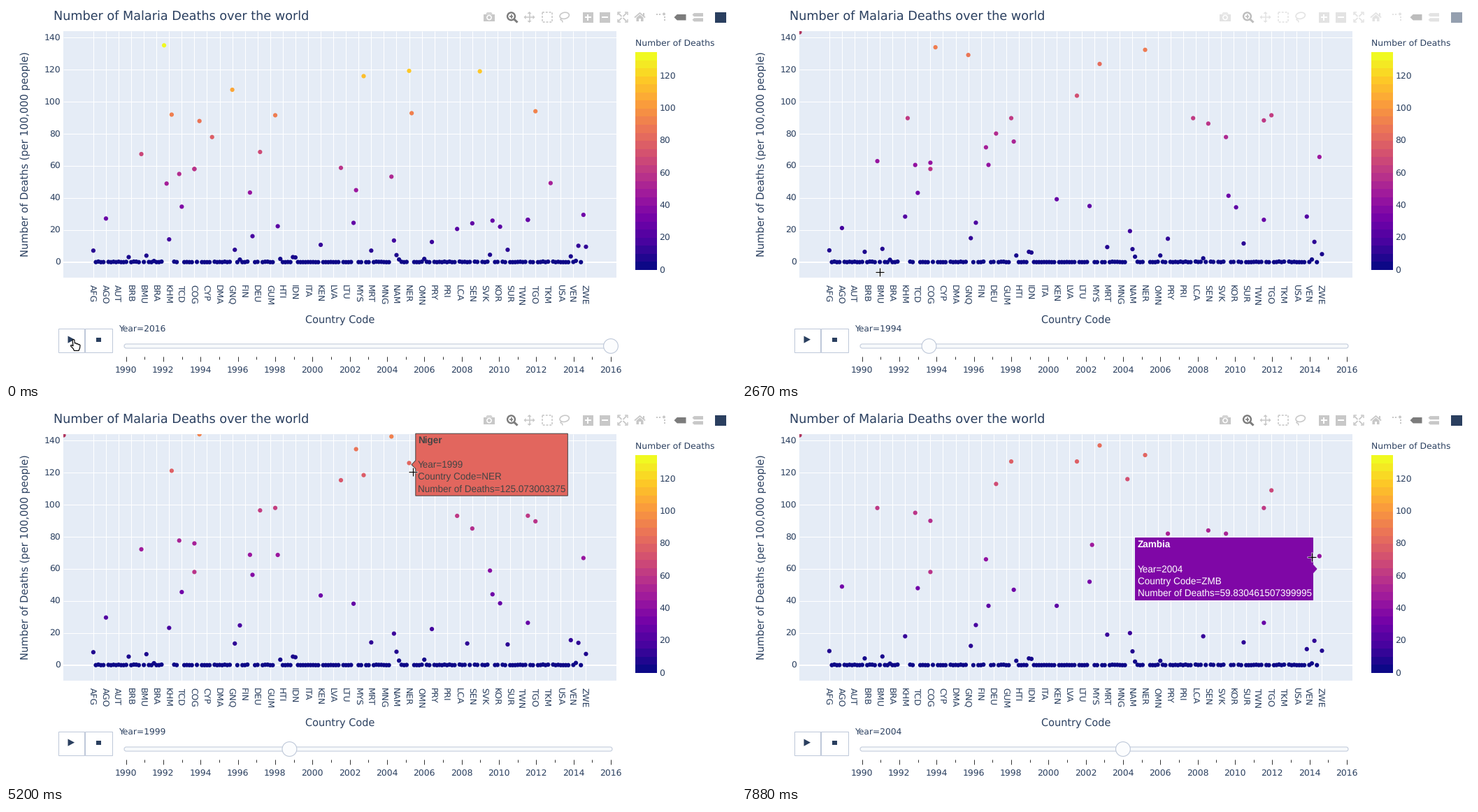
These frames come from a looping animation (1044x537 px, 8000 ms). A matplotlib script:

```python
import matplotlib.pyplot as plt
import numpy as np
from matplotlib.animation import FuncAnimation
from matplotlib.collections import LineCollection
from matplotlib.colors import LinearSegmentedColormap
from matplotlib.patches import Circle, Ellipse, FancyBboxPatch, Polygon, Rectangle

W, H, DPI = 1044, 537, 72          # at 72 dpi one point is one pixel
FRAMES, INTERVAL = 160, 50
STEP = 148.6                       # the picture refreshes this often, in ms
INK, RIM, PAPER = "#2a3f5f", "#bec8d9", "#e5ecf6"
LIGHT, DARK = "#c8c8c8", "#7c7c7c"
PLASMA = LinearSegmentedColormap.from_list("heat", [
    "#0d0887", "#46039f", "#7201a8", "#9c179e", "#bd3786",
    "#d8576b", "#ed7953", "#fb9f3a", "#fdca26", "#f0f921"], N=512)
X0, DX, Y0, DY = 124.9, 3.613, 366.8, 2.2964
SLIDE0, SLIDE_DX = 171.5, 26.673
CODES = ("AFG AGO AUT BRB BMU BRA KHM TCD COG CYP DMA GNQ FIN DEU GUM HTI IDN "
         "ITA KEN LVA LTU MYS MRT MNG NAM NER OMN PRY PRI LCA SEN SVK KOR SUR "
         "TWN TGO TKM USA VEN ZWE").split()

plt.rcParams["font.family"] = "DejaVu Sans"
plt.rcParams["text.hinting"] = "none"
fig = plt.figure(figsize=(W / DPI, H / DPI), dpi=DPI, facecolor="white")
ax = fig.add_axes([0, 0, 1, 1])
ax.set(xlim=(0, W), ylim=(H, 0))
ax.autoscale(False)
ax.axis("off")


# ---- drawing helpers
def text(x, y, s, size=12.4, ha="left", color=INK, **kw):
    return ax.text(x, y, s, fontsize=size, ha=ha, va="baseline", color=color,
                   rotation_mode="anchor", **kw)


def box(x0, y0, x1, y1, fill, edge="none", lw=1, **kw):
    return ax.add_patch(Rectangle((x0, y0), x1 - x0, y1 - y0, fc=fill, ec=edge,
                                  lw=lw, **kw))


def poly(pts, fill, edge="none", lw=1, **kw):
    return ax.add_patch(Polygon(pts, closed=True, fc=fill, ec=edge, lw=lw, **kw))


def disc(x, y, r, fill, edge="none", lw=1, **kw):
    return ax.add_patch(Circle((x, y), r, fc=fill, ec=edge, lw=lw, **kw))


def stroke(xs, ys, color, lw=1.5):
    ax.plot(xs, ys, color=color, lw=lw, solid_capstyle="butt")


def segments(segs, color, lw=1):
    ax.add_collection(LineCollection(segs, colors=color, linewidths=lw, zorder=1.5),
                      autolim=False)


# ---- chart
def draw_chart():
    plot = box(81.5, 36, 873, 389, PAPER)
    ticks = X0 + 5 * DX * np.arange(len(CODES))
    rows = Y0 - DY * np.arange(0, 141, 20)
    segments([[(x, 36), (x, 389)] for x in ticks], "white")
    segments([[(81.5, y), (873, y)] for y in rows], "white")
    segments([[(81.5, Y0), (873, Y0)]], "white", 2)
    for k, y in enumerate(rows):
        text(78, y + 4.3, str(20 * k), ha="right")
    for x, code in zip(ticks, CODES):
        text(x - 5.7, 399, code, rotation=270)
    text(68, 19.3, "Number of Malaria Deaths over the world", 17.6)
    text(477.5, 453.8, "Country Code", 14.5, "center")
    text(31.5, 212, "Number of Deaths (per 100,000 people)", 14.6, "center", rotation=90)
    return plot


def draw_colorbar():
    ax.pcolormesh([900, 931], np.linspace(378, 66, 28), np.arange(27)[:, None],
                  cmap=PLASMA, vmin=0, vmax=26)
    text(900.5, 57, "Number of Deaths")
    for v in range(0, 121, 20):
        text(934.5, 382.5 - 2.315 * v, str(v))


def draw_controls():
    box(75, 462.3, 111.5, 496, "white", RIM)
    stop = box(113.3, 462.3, 151.8, 496, "white", RIM)
    poly([(88.5, 472.5), (98, 477.6), (88.5, 482.8)], INK)
    box(129, 474.7, 135.5, 481.2, INK)
    ax.add_patch(FancyBboxPatch((172, 487), 692, 0.01, fc="#f8fafc", ec=RIM, lw=1,
                                boxstyle="round,pad=3,rounding_size=3"))
    for k in range(27):
        x = SLIDE0 + SLIDE_DX * k
        stroke([x, x], [502, 505.5 if k % 2 else 509], "#333333", 1)
        if k % 2 == 0:
            text(x, 526.3, str(1990 + k), ha="center")
    return stop


def tag(x, y, w, h, color):
    poly([(x, y), (x + h / 2, y - h / 2), (x + w, y - h / 2),
          (x + w, y + h / 2), (x + h / 2, y + h / 2)], color)


def draw_modebar():
    box(683, 11.5, 699, 22, LIGHT)
    poly([(686, 11.5), (688, 9.3), (694, 9.3), (696, 11.5)], LIGHT)
    disc(691, 16.5, 3.9, "white")
    disc(691, 16.5, 2.3, LIGHT)

    disc(722.5, 14.8, 5.4, "none", DARK, 2.4)
    stroke([726.5, 731.5], [18.8, 23.5], DARK, 3)
    stroke([719.8, 725.2], [14.8, 14.8], DARK, 1.6)
    stroke([722.5, 722.5], [12.1, 17.5], DARK, 1.6)

    stroke([742, 755], [16, 16], LIGHT)
    stroke([748.5, 748.5], [9.5, 22.5], LIGHT)
    for a in range(4):
        c, s = np.cos(a * np.pi / 2), np.sin(a * np.pi / 2)
        head = np.array([(8, 0), (5, 3), (5, -3)])
        poly(head @ np.array([[c, s], [-s, c]]) + (748.5, 16), LIGHT)

    box(766.5, 9, 781, 23, "none", LIGHT, 1.6, ls=(0, (1.8, 1.2)))
    ax.add_patch(Ellipse((798.7, 13.8), 13.5, 9, angle=-12, fc="none", ec=LIGHT, lw=1.6))
    stroke([794, 793, 795.5, 796], [17.5, 19.5, 21, 23.5], LIGHT)

    for x in (832, 856):
        box(x - 7.5, 9, x + 7.5, 23.5, LIGHT)
        stroke([x - 4.5, x + 4.5], [16.2, 16.2], "white", 2)
    stroke([832, 832], [11.7, 20.7], "white", 2)

    for sx in (-1, 1):
        for sy in (-1, 1):
            x, y = 881.5 + 7 * sx, 16 + 7 * sy
            stroke([x - 4 * sx, x, x], [y, y, y - 4 * sy], LIGHT)
            stroke([x - sx, x - 6 * sx], [y - sy, y - 6 * sy], LIGHT, 1.8)

    stroke([899, 906.5, 914], [16.5, 10, 16.5], LIGHT, 1.8)
    box(911, 10, 913, 14, LIGHT)
    poly([(901.5, 16.7), (906.5, 12.4), (911.5, 16.7), (911.5, 22), (908, 22),
          (908, 18), (905, 18), (905, 22), (901.5, 22)], LIGHT)

    for x, y in ((931, 11.5), (935, 11.5), (942, 15.5), (942, 19.5)):
        box(x - 1, y - 1, x + 1, y + 1, LIGHT)
    disc(941, 11.5, 2, LIGHT)
    tag(955.5, 16.2, 17, 8.5, DARK)
    tag(981.5, 12.6, 15.5, 5, LIGHT)
    tag(981.5, 19.8, 15.5, 5, LIGHT)
    box(1014, 8.5, 1030, 24, INK)
    return box(680, 5, 1034, 27, "white", zorder=3)


def tooltip(first, last, x0, x1, cy, tip, fill, ink, edge, name, *lines):
    """Hover label shown from one refresh to another, with its pointer at tip."""
    top, low = cy - 44.5, cy + 44.5
    side, far = (x0, x1) if tip < x0 else (x1, x0)
    pts = [(side, top), (side, cy - 6), (tip, cy), (side, cy + 6), (side, low),
           (far, low), (far, top)]
    style = dict(size=13.5, color=ink, family="Liberation Sans", zorder=6)
    parts = [poly(pts, fill, edge, zorder=5),
             text(x0 + 3, cy - 31, name, weight="bold", **style)]
    for k, line in enumerate(lines):
        parts.append(text(x0 + 3, cy + 4.4 + 17.4 * k, line, **style))
    return first, last, parts


plot = draw_chart()
draw_colorbar()
stop_button = draw_controls()
veil = draw_modebar()
label = text(161.5, 466.8, "", 12.3)
knob = disc(SLIDE0, 487, 10.4, "#fcfdfe", RIM, 1.1, zorder=3)
tips = [
    tooltip(23, 28, 208.5, 425, 353, 202.5, "black", "white", "black", "Bhutan",
            "Year=1996", "Country Code=BTN", "Number of Deaths=6.01084193607"),
    tooltip(33, 38, 585.8, 803.3, 79.7, 580, "#e2665e", "#444444", "#444444", "Niger",
            "Year=1999", "Country Code=NER", "Number of Deaths=125.073003375"),
    tooltip(42, 49, 754, 1000.5, 148.5, 748.5, "black", "white", "black", "Tanzania",
            "Year=2002", "Country Code=TZA", "Number of Deaths=95.03006518120002"),
    tooltip(51, 60, 562.5, 816.5, 229, 822, "#7f07a6", "white", "#7f07a6", "Zambia",
            "Year=2004", "Country Code=ZMB", "Number of Deaths=59.830461507399995"),
]

# ---- data: most countries stay near zero, the rest follow a few key values
COUNT, LAST = 196, 14              # countries, years played after 1990
OFF = 170                          # above the visible range
rng = np.random.default_rng(4)
start = 0.4 * rng.random(COUNT) ** 4               # value in 2016
years = np.linspace(1, LAST, 2 * LAST - 1)
curve = np.repeat(start[:, None], len(years), axis=1)


def track(i, first, *keys):
    """Value in 2016, then values spread evenly over the played years."""
    start[i] = first
    curve[i] = np.interp(years, np.linspace(1, LAST, len(keys)), keys)


# low counts that shrink at one common rate
for i, v in {14: 7, 21: 9, 24: 1.6, 74: 4.5, 79: 7, 80: 6.5,
             121: 3.7, 131: 4.5, 191: 1.8}.items():
    track(i, 0.45 * v, v, 0.6 * v)
# visible in 2016 only
for i, v in {28: 135.2, 29: 49, 47: 78, 153: 119, 181: 49.3}.items():
    track(i, v, OFF, OFF)
# steady change: 2016, early, late
for i, keys in {
        0: (7.2, 7, 8.8), 30: (14.2, 31, 18), 31: (92, 74, 153), 34: (55, 52, 95),
        35: (34.6, 42, 48), 40: (58.1, 55, 90), 42: (88, 129, 154), 55: (107.5, 94, 270),
        56: (7.7, 15.7, 12), 58: (1.6, 24.5, 25), 62: (43.4, 73, 66), 66: (68.7, 72, 113),
        98: (58.8, 98, 127), 110: (7.2, 7, 19), 118: (53.3, 182, 116), 119: (13.5, 19.2, 20),
        120: (4.4, 8, 8.6), 126: (92.9, 144, 230), 150: (24.2, 87, 84), 158: (25.9, 40, 47),
        161: (22.1, 32, 43), 164: (7.7, 11, 14.2), 172: (26.4, 86, 98),
        192: (10.2, 12, 15.2), 194: (29.5, 65, 68), 195: (9.6, 4, 9)}.items():
    track(i, *keys)
# paths that bend
track(5, 27.2, 18.8, 25, 49)
track(19, 67.4, 61, 66, 98)
track(63, 16.2, 60.4, 61, 37)
track(72, 91.6, 89, 91, 127)
track(73, 22.4, 76, 74, 47)
track(90, 10.8, 35.4, 45, 37)
track(103, 24.5, 35, 35, 52)
track(104, 44.9, 165, 145, 132, 75)
track(107, 116, 130, 114, 137)
track(125, 119.3, 136, 130, 125, 131)
track(134, 12.6, 17, 13, 25, 82)
track(144, 20.7, 85, 97, 77)
track(148, 0, 0, 4, 16, 18)
track(157, 4.6, 78, 78, 54, 82)
track(175, 94.1, 96, 85, 109)
track(189, 3.6, 50, 14, 16, 10)

xs = X0 + DX * np.arange(COUNT)


def dots(x, y, color):
    sc = ax.scatter(x, y, s=39, c=color, lw=0, zorder=2)
    sc.set_clip_path(plot)
    return sc


points = dots(xs, xs, ["#0d0887"] * COUNT)
left = [40, 172]                   # two dots keep their 2016 place
dots(xs[left], Y0 - DY * start[left], PLASMA(start[left] / 135.2))
corner = dots([82], [36.5], ["#b0365f"])

# ---- cursors
HAND = np.array([(3, 1), (5, .5), (6, 2), (6.3, 6), (8, 5.6), (9, 7), (10.5, 6.5),
                 (11.5, 8), (13, 7.6), (14, 9), (13.5, 13), (12, 16.5), (5.5, 16.5),
                 (4, 13.5), (1, 10.5), (.5, 9), (2, 8.6), (4, 10)]) - (4, 1)
ARROW = np.array([(0, 0), (0, 14), (3.3, 11), (5.5, 16), (7.6, 15), (5.5, 10.3), (10, 10)])
hand = poly(HAND, "white", "black", 1.2, zorder=9)
arrow = poly(ARROW, "black", "white", 1, zorder=9)
cross = [ax.plot([0], [0], "+", color=c, ms=m, mew=w, zorder=9, alpha=a)[0]
         for c, m, w, a in (("white", 14, 3, 0.6), ("black", 12, 1.2, 1))]
PATH_N = [0, 1, 5, 8, 11, 18, 25, 35, 47, 53]
PATH_X = [96, 97, 97, 134, 134, 197, 202.5, 581.5, 737.5, 815]
PATH_Y = [478, 478, 478, 481, 481, 380.5, 351, 90, 132, 211.5]

# ---- timeline: when the move to each year begins
STARTS = np.interp(np.arange(1990, 2006),
                   [1990, 1991, 1994, 1996, 1999, 2002, 2003, 2004, 2005],
                   [600, 824, 2424, 3361, 4894, 6480, 6995, 7400, 8100])


def ease(u):
    return 4 * u ** 3 if u < 0.5 else 1 - 4 * (1 - u) ** 3


def mix(a, b, w):
    return (1 - w) * a + w * b


def values_at(pos):
    at = 2 * (np.clip(pos, 1, LAST) - 1)
    k = min(int(at), len(years) - 2)
    return mix(curve[:, k], curve[:, k + 1], at - k)


def state(t):
    """Year label, slider position, values and colour range at time t."""
    j = int(np.searchsorted(STARTS, t, "right")) - 1
    if j < 0:
        return 2016, 26, start, 135.2
    e = ease(min(1, (t - STARTS[j]) / min(500, STARTS[j + 1] - STARTS[j])))
    if j == 0:
        return 1990, 26 * (1 - e), mix(start, curve[:, 0], e), 190
    pos = j - 1 + e
    return 1990 + j, pos, values_at(pos), 190 + 2 * pos


def update(frame):
    n = int((frame * INTERVAL + 40) / STEP)
    year, pos, v, top = state(n * STEP)
    label.set_text(f"Year={year}")
    knob.center = SLIDE0 + SLIDE_DX * pos, 487
    points.set_offsets(np.column_stack([xs, Y0 - DY * v]))
    points.set_facecolor(PLASMA(v / top))
    corner.set_visible(year != 2016)
    veil.set_alpha(1 - np.interp(n, [9, 11, 16, 20], [1, 0, 0, 1]))

    x, y = np.interp(n, PATH_N, PATH_X), np.interp(n, PATH_N, PATH_Y)
    in_plot, on_button = y < 389, y > 462
    hand.set_visible(on_button)
    arrow.set_visible(not in_plot and not on_button)
    hand.set_xy(HAND + (x, y))
    arrow.set_xy(ARROW + (x, y))
    for line in cross:
        line.set_visible(in_plot)
        line.set_data([x], [y])
    stop_button.set_facecolor("#f4faff" if on_button and x > 113 else "white")
    for first, last, parts in tips:
        for part in parts:
            part.set_visible(first <= n <= last)
    return []


anim = FuncAnimation(fig, update, frames=FRAMES, interval=INTERVAL, repeat=True,
                     repeat_delay=0, init_func=lambda: update(0), blit=False)
plt.show()
```
